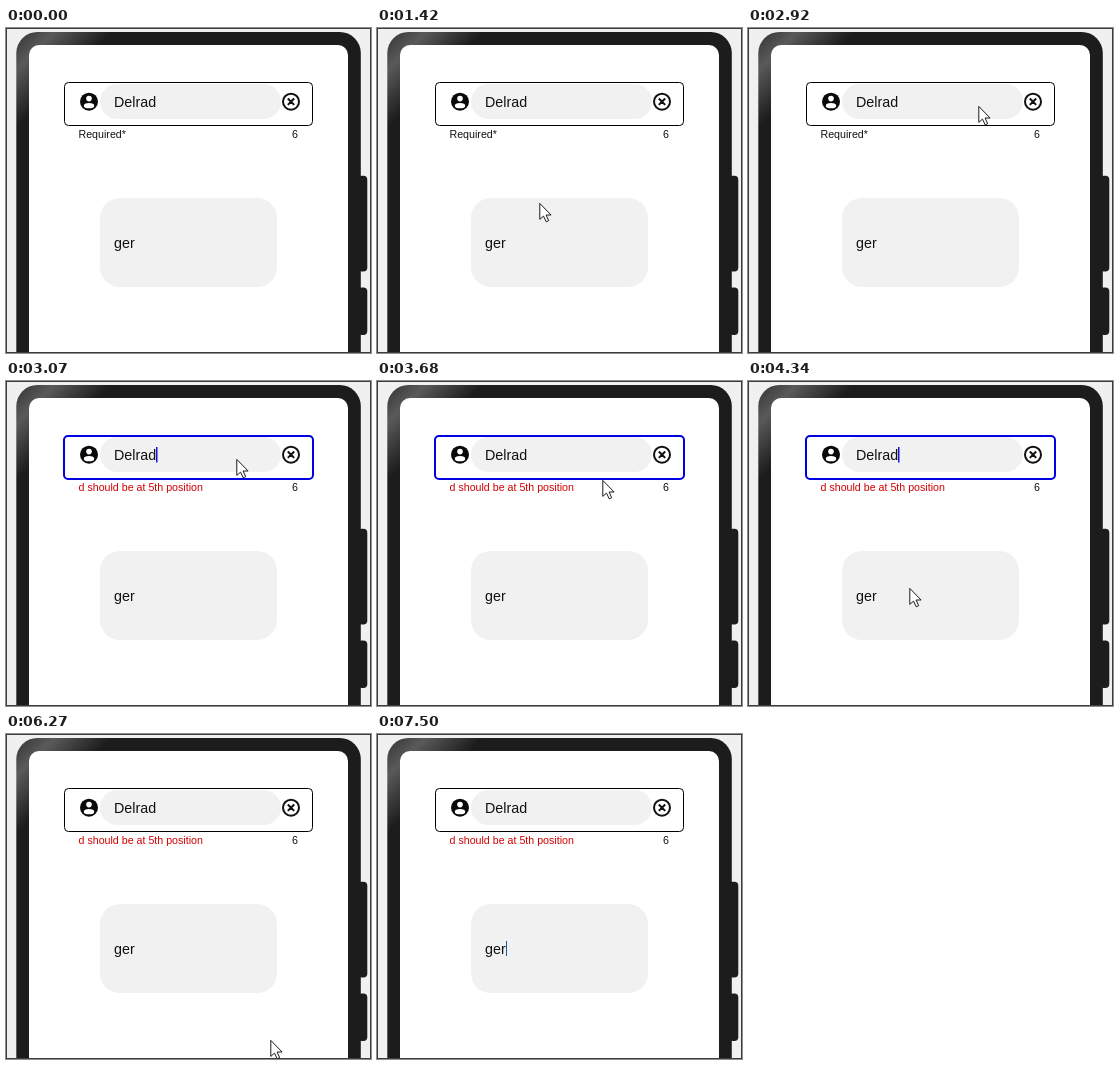
An HTML page with a canvas that plays this animation: 365 by 325 pixels, repeating every 7.63 s.

```html
<!DOCTYPE html>
<html lang="en">
<head>
<meta charset="utf-8">
<title>Form field validation</title>
<style>
  html, body { margin: 0; width: 100%; height: 100%; overflow: hidden; background: #f0f0f0; }
  canvas, svg { position: absolute; left: 0; top: 0; width: 365px; height: 325px; }
  text { font: 10.67px "Liberation Sans", Arial, sans-serif; fill: #111; }
  .value { font-size: 14.3px; }
</style>
</head>
<body>
<canvas id="stage" width="365" height="325"></canvas>
<svg viewBox="0 0 365 325">
  <text class="value" x="108" y="79">Delrad</text>
  <text id="hint" x="72.5" y="110">Required*</text>
  <text x="286" y="110">6</text>
  <text class="value" x="108" y="219.5">ger</text>
</svg>
<script>
const LOOP = 7630;
const FOCUS = 3070, BLUR = 5380;
const BLINK = 510;
const TICK = 130;
const POINTER_START = 1120, POINTER_END = 6540;

const ctx = document.getElementById('stage').getContext('2d');
const hint = document.getElementById('hint');
const arrow = new Path2D('M0 0V16L3.7 12.7 6.4 18.4 8.9 17.3 6.3 11.6H11.3Z');

const easeOut = power => u => 1 - (1 - u) ** power;
const glide = power => u => {
  const s = u ** power;
  return s * s * (3 - 2 * s);
};

// Each move starts where the previous one ended.
const MOVES = [
  { start: POINTER_START, end: 2070, to: [157, 82], ease: [easeOut(4.3), easeOut(2.15)] },
  { start: 2090, end: 2220, to: [159, 74], ease: [glide(1), glide(1)] },
  { start: 2650, end: 2910, to: [231, 78], ease: [glide(1), glide(1)] },
  { start: 3290, end: 4320, to: [162, 207], ease: [glide(1.8), glide(1.4)] },
  { start: 5740, end: 6380, to: [282, 322], ease: [glide(1.2), glide(1.2)] }
];

function pointerAt(t) {
  let pos = [182, 274];
  for (const { start, end, to, ease } of MOVES) {
    if (t < start) break;
    const steps = Math.round((end - start) / TICK);
    const progress = Math.min(1, (t - start) / (end - start));
    const u = Math.floor(progress * steps) / steps;
    pos = pos.map((from, i) => from + (to[i] - from) * ease[i](u));
  }
  return pos;
}

function roundBox(x, y, w, h, r, fill) {
  ctx.beginPath();
  ctx.roundRect(x, y, w, h, r);
  if (fill) {
    ctx.fillStyle = fill;
    ctx.fill();
  }
}

function disc(x, y, r, fill) {
  ctx.beginPath();
  ctx.arc(x, y, r, 0, Math.PI * 2);
  ctx.fillStyle = fill;
  ctx.fill();
}

function drawPhone() {
  ctx.fillStyle = '#f0f0f0';
  ctx.fillRect(0, 0, 365, 325);
  roundBox(352, 147.7, 9.3, 95.8, 4, '#1c1c1c');
  roundBox(352, 259.5, 9.3, 47.5, 4, '#1c1c1c');
  const shine = ctx.createLinearGradient(10, 4, 58, 52);
  shine.addColorStop(0, '#333');
  shine.addColorStop(0.4, '#5a5a5a');
  shine.addColorStop(1, '#1c1c1c');
  roundBox(10.3, 4, 344.5, 360, 21, shine);
  roundBox(23, 17, 319, 360, 10, '#fff');
  ctx.strokeStyle = '#3c3c3c';
  ctx.lineWidth = 1;
  ctx.strokeRect(0.5, 0.5, 364, 324);
}

function drawUserIcon(x, y) {
  disc(x, y, 9, '#0a0a0a');
  disc(x, y - 3.1, 2.8, '#fff');
  ctx.beginPath();
  ctx.ellipse(x, y + 4, 5.2, 2.6, 0, 0, Math.PI * 2);
  ctx.fill();
}

function drawClearIcon(x, y) {
  const arm = 3.2;
  ctx.strokeStyle = '#111';
  ctx.lineWidth = 2;
  ctx.beginPath();
  ctx.arc(x, y, 8, 0, Math.PI * 2);
  for (const side of [-1, 1]) {
    ctx.moveTo(x - arm, y - arm * side);
    ctx.lineTo(x + arm, y + arm * side);
  }
  ctx.stroke();
}

function drawFields(focused) {
  roundBox(94, 56, 181, 35, 17.5, '#f1f1f1');
  roundBox(94, 170, 177, 89, 20, '#f1f1f1');
  if (focused) roundBox(58, 55, 249, 43, 4);
  else roundBox(58.5, 54.5, 248, 43, 4);
  ctx.strokeStyle = focused ? '#0000e0' : '#000';
  ctx.lineWidth = focused ? 2 : 1;
  ctx.stroke();
  drawUserIcon(83, 73.7);
  drawClearIcon(285, 73.7);
}

function drawCaret(t) {
  const first = t < BLUR;
  const since = t - (first ? FOCUS : BLUR);
  if (since < 0 || Math.floor(since / BLINK) % 2) return;
  ctx.fillStyle = first ? '#1414e0' : '#1f5c9e';
  if (first) ctx.fillRect(150, 66, 1.5, 15.5);
  else ctx.fillRect(129, 207, 1, 15);
}

function drawPointer(t) {
  if (t < POINTER_START || t >= POINTER_END) return;
  const [x, y] = pointerAt(t);
  ctx.save();
  ctx.translate(Math.round(x) - 0.2, Math.round(y) + 0.4);
  ctx.fillStyle = '#fff';
  ctx.fill(arrow);
  ctx.strokeStyle = '#1a1a1a';
  ctx.lineWidth = 1;
  ctx.stroke(arrow);
  ctx.restore();
}

function render() {
  const t = performance.now() % LOOP;
  const failed = t >= FOCUS;
  drawPhone();
  drawFields(failed && t < BLUR);
  drawCaret(t);
  drawPointer(t);
  hint.textContent = failed ? 'd should be at 5th position' : 'Required*';
  hint.style.fill = failed ? '#d00000' : '#111';
  requestAnimationFrame(render);
}
render();
</script>
</body>
</html>
```
